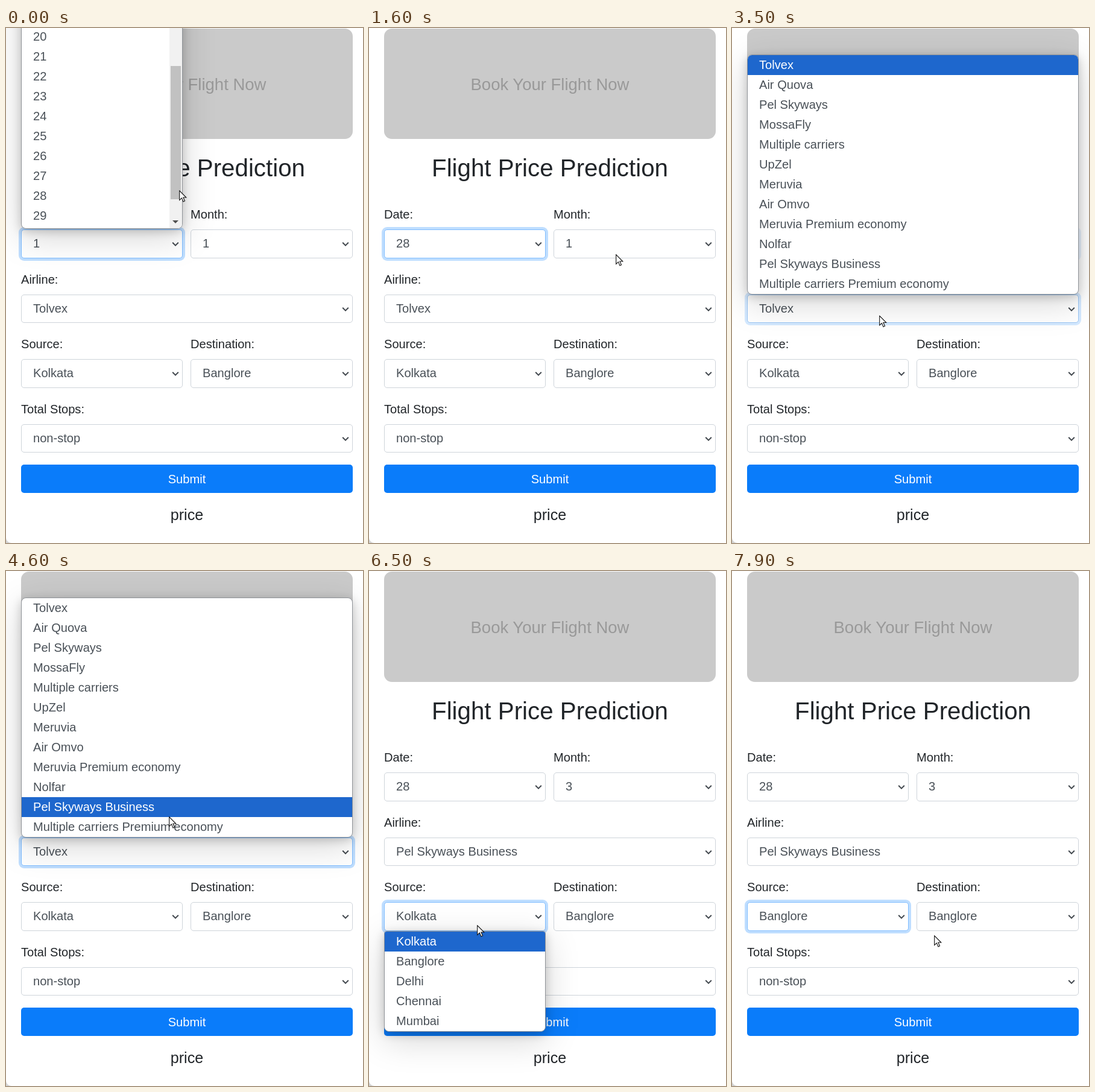
An HTML page for the animation above (8000 ms loop, 592 by 854 pixels).

```html
<!DOCTYPE html>
<html lang="en">
<head>
<meta charset="utf-8">
<title>Flight Price Prediction</title>
<style>
html, body { margin: 0; width: 100%; height: 100%; overflow: hidden; background: #d3d3d3; }
#stage {
  position: absolute; left: 0; top: 0; width: 592px; height: 854px; overflow: hidden;
  font: 20.1px/33px "Liberation Sans", Arial, sans-serif; color: #212529;
}
#stage * { box-sizing: border-box; }
#card { position: absolute; inset: 0; background: #fff; border-radius: 0 0 0 9px; }
.text, .field, .panel, .row, .bar, #banner, #submit, #cursor { position: absolute; white-space: pre; }
.text { height: 60px; margin-top: -30px; line-height: 60px; }
.mid { left: 0; width: 600px; text-align: center; }
#banner { left: 25px; top: 1px; width: 550px; height: 183px; border-radius: 13px; background: #cacaca; }
#submit { left: 25px; top: 724px; width: 550px; height: 47px; border-radius: 5px; background: #0a7cfa; }
.field {
  height: 47.5px; padding-left: 19px; line-height: 45.5px; color: #495057;
  background: #fff; border: 1px solid #ced4da; border-radius: 5px;
}
.field svg { position: absolute; right: 5px; top: 19px; }
.panel {
  overflow: hidden; background: #fff; color: #495057; border: 1px solid #8f9398; border-radius: 8px;
  box-shadow: 0 14px 56px rgba(0,0,0,.17), 0 4px 16px rgba(0,0,0,.2);
}
.down { border-radius: 4px 4px 8px 8px; }
.row { left: 0; width: 100%; height: 33px; padding-left: 19px; }
.row.on { background: #1e67cd; color: #fff; }
.bar { right: 0; top: 0; bottom: 0; width: 21px; background: #f1f1f1; }
.bar i { position: absolute; left: 2px; top: 222px; width: 17px; height: 221px; background: #c1c1c1; }
.bar b { position: absolute; left: 5px; bottom: 8px; border: 5px solid transparent; border-top-color: #505050; border-bottom: 0; }
#cursor { left: 0; top: 0; }
</style>
</head>
<body>
<div id="stage">
  <div id="card"></div>
  <div id="banner"></div>
  <div id="submit"></div>
</div>
<script>
const LOOP = 8000, STEP = 100, ROW = 33, FADE = 150;
const stage = document.getElementById('stage');

function add(cls, css, html = '', parent = stage) {
  const el = document.createElement('div');
  el.className = cls;
  el.style.cssText = css;
  el.innerHTML = html;
  parent.append(el);
  return el;
}

const label = (text, x, y) => add('text', `left:${x}px;top:${y}px`, text);
const centered = (text, y, size, color) =>
  add('text mid', `top:${y}px;font-size:${size}px;color:${color}`, text);

centered('Book Your Flight Now', 93.5, 27.5, '#999');
centered('Flight Price Prediction', 233, 40.3, '#212529');
centered('Submit', 748, 20.1, '#fff');
centered('price', 806.5, 25.1, '#212529');

const chevron = '<svg width="12" height="9"><path d="M1.2 1.8 6 6.6 10.8 1.8" fill="none" stroke="#42484e" stroke-width="2"/></svg>';

function makeField(name, x, y, w, value) {
  label(name + ':', x, y - 25);
  const el = add('field', `left:${x}px;top:${y}px;width:${w}px`, `<span></span>${chevron}`);
  const span = el.firstChild;
  span.textContent = value;
  return { el, span, value };
}

const date = makeField('Date', 25, 334, 268, '1');
const month = makeField('Month', 306, 334, 269, '1');
const airline = makeField('Airline', 25, 441.8, 550, 'Tolvex');
const source = makeField('Source', 25, 549.3, 268, 'Kolkata');
makeField('Destination', 306, 549.3, 269, 'Banglore');
makeField('Total Stops', 25, 656.8, 550, 'non-stop');

const count = n => Array.from({ length: n }, (_, i) => String(i + 1));
const airlines = ['Tolvex', 'Air Quova', 'Pel Skyways', 'MossaFly', 'Multiple carriers', 'UpZel',
  'Meruvia', 'Air Omvo', 'Meruvia Premium economy', 'Nolfar', 'Pel Skyways Business',
  'Multiple carriers Premium economy'];
const cities = ['Kolkata', 'Banglore', 'Delhi', 'Chennai', 'Mumbai'];

// A field's list: focus starts at `focus`, the list shows from `open` until `close`.
function makeList(field, items, box, times) {
  const { x, y, w, h, first = y + 1, right = x + w, down } = box;
  const el = add(down ? 'panel down' : 'panel', `left:${x}px;top:${y}px;width:${w}px;height:${h}px`);
  const rows = items.map((text, i) => add('row', `top:${first + i * ROW - y - 1}px`, text, el));
  return { field, items, el, rows, x, y, h, first, right, ...times };
}

const lists = [
  makeList(date, count(31), { x: 25, y: -160, w: 268, h: 493, first: -629, right: 272 },
    { focus: -1000, open: -1000, close: 800, pick: 27 }),
  makeList(month, count(12), { x: 307, y: 382, w: 268, h: 398, down: true },
    { focus: 1700, open: 1700, close: 3000, pick: 2 }),
  makeList(airline, airlines, { x: 25, y: 44, w: 550, h: 398 },
    { focus: 3400, open: 3400, close: 5000, pick: 10 }),
  makeList(source, cities, { x: 25, y: 597, w: 268, h: 167, down: true },
    { focus: 6300, open: 6300, close: 7400, pick: 1 })
];
add('bar', '', '<i></i><b></b>', lists[0].el);

const cursor = add('', '', '<svg width="14" height="21" style="display:block"><path d="M.7.8V16.4L4.4 12.9 7 18.9 9.5 17.8 6.9 12H11.8Z" fill="#fff" stroke="#111" stroke-width="1.1"/></svg>');
cursor.id = 'cursor';

// Pointer stops: time, x, y
const path = [
  [0, 287, 269], [100, 287, 269], [500, 190, 277], [800, 182, 278], [1000, 200, 288],
  [1600, 409, 375], [1800, 411, 376], [2700, 383, 481], [2900, 382, 477], [3000, 380, 477],
  [3400, 244, 476], [3600, 244, 477], [4200, 264, 416], [4600, 270, 407], [5000, 270, 400],
  [5200, 264, 412], [6200, 181, 585], [6500, 179, 587], [7000, 184, 643], [7400, 186, 646],
  [7900, 335, 604], [8000, 335, 604]
];

function pointer(t) {
  const i = Math.max(1, path.findIndex(p => p[0] >= t));
  const [t0, x0, y0] = path[i - 1], [t1, x1, y1] = path[i];
  const u = (t - t0) / (t1 - t0), e = u * u * (3 - 2 * u);
  return [x0 + (x1 - x0) * e, y0 + (y1 - y0) * e];
}

const clamp = v => Math.min(1, Math.max(0, v));
const mix = (a, b, k) => a.map((v, i) => v + (b[i] - v) * k);

function draw(t) {
  const [x, y] = pointer(t);
  cursor.style.transform = `translate(${x}px,${y}px)`;
  lists.forEach((list, n) => {
    const { field, items, rows } = list;
    const blur = lists[n + 1] ? lists[n + 1].focus : Infinity;
    const k = clamp((t - list.focus) / FADE) - clamp((t - blur) / FADE);
    field.el.style.borderColor = `rgb(${mix([206, 212, 218], [128, 189, 255], k)})`;
    field.el.style.boxShadow = `0 0 0 4px rgba(0,123,255,${0.25 * k})`;
    field.span.textContent = t >= list.close ? items[list.pick] : field.value;

    const open = t >= list.open && t < list.close;
    list.el.style.visibility = open ? 'visible' : 'hidden';
    const inside = x > list.x && x < list.right && y > list.y && y < list.y + list.h - 1;
    const hot = inside ? Math.floor((y - list.first) / ROW) : 0;
    rows.forEach((row, i) => row.classList.toggle('on', i === hot));
  });
}

const start = performance.now();
function tick() {
  const t = (performance.now() - start) % LOOP;
  draw(Math.floor(t / STEP) * STEP);
  requestAnimationFrame(tick);
}
tick();
</script>
</body>
</html>
```
